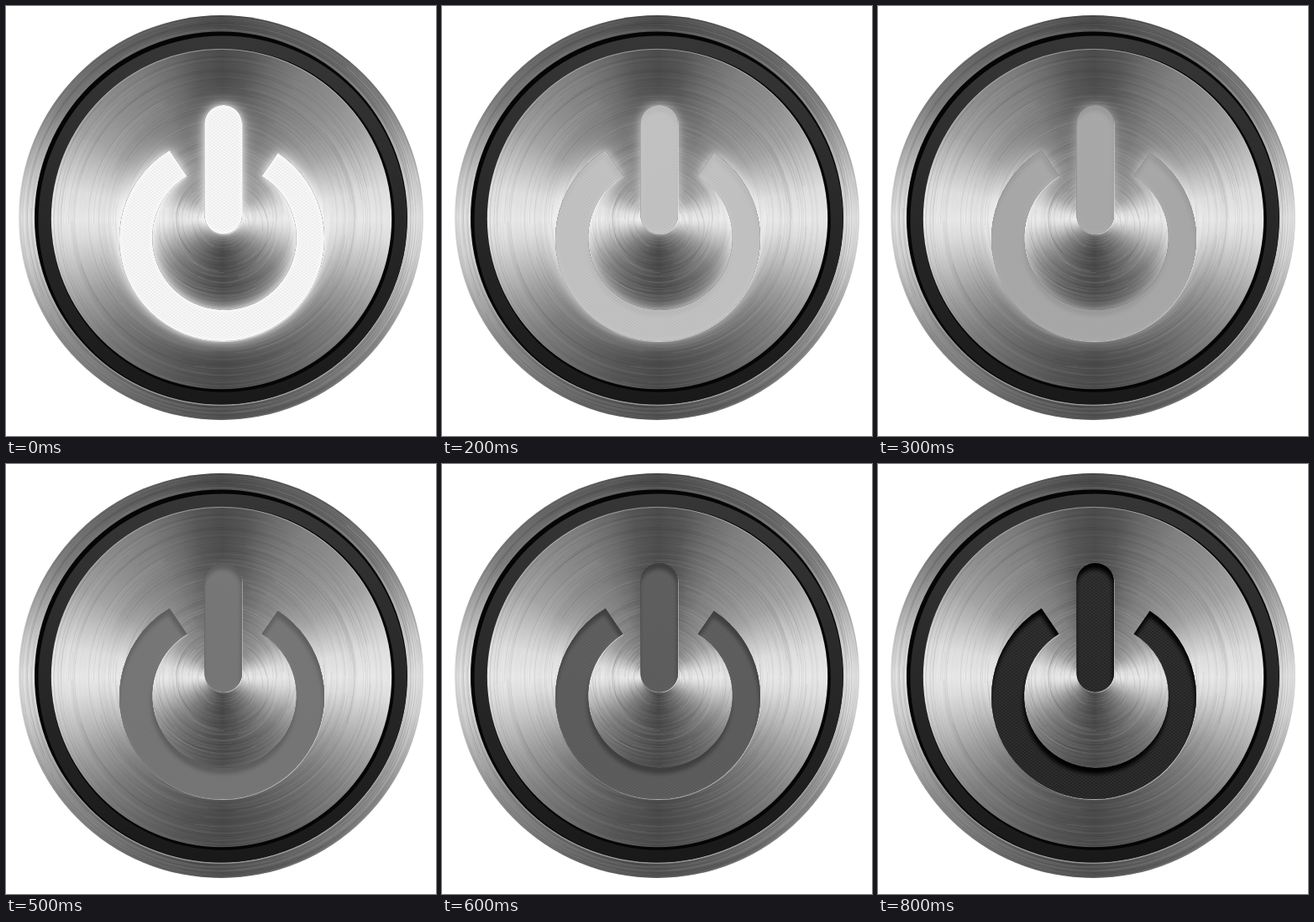
An HTML page with a canvas for the animation above (900 ms loop, 512 px wide and 512 px high).

```html
<!DOCTYPE html>
<html lang="en">
<head>
<meta charset="utf-8">
<title>Power button</title>
<style>
  html, body { margin: 0; width: 100%; height: 100%; overflow: hidden; background: #fff; }
  canvas { display: block; width: 512px; height: 512px; }
</style>
</head>
<body>
<canvas id="stage" width="512" height="512"></canvas>
<script>
const SIZE = 512, STEP = 100, STEPS = 9;
const GLOW = [1, .85, .7, .5, .3, .08, 0, 0, 0];
const ctx = document.getElementById('stage').getContext('2d');

// Quarter-turn brightness, from the horizontal to the vertical axis.
const UPPER = [[0, 232], [.03, 222], [.06, 193], [.09, 163], [.125, 144], [.17, 127], [.2, 108], [.225, 86], [.25, 76]];
const LOWER = [[0, 232], [.02, 221], [.05, 192], [.085, 156], [.125, 124], [.17, 101], [.21, 84], [.25, 72]];
const RIM_UPPER = [[0, 228], [.03, 205], [.06, 168], [.1, 124], [.15, 103], [.2, 92], [.25, 72]];
const RIM_LOWER = [[0, 228], [.03, 212], [.06, 180], [.1, 141], [.15, 116], [.2, 92], [.25, 76]];

let seed = 17;
const random = () => (seed = seed * 16807 % 2147483647) / 2147483647;
const grey = v => `rgb(${v},${v},${v})`;

function layer() {
  const c = document.createElement('canvas');
  c.width = c.height = SIZE;
  return c.getContext('2d');
}

function disc(x, y, r) {
  const p = new Path2D();
  p.arc(x, y, r, 0, Math.PI * 2);
  return p;
}

function vertical(g, y0, y1, top, bottom) {
  const fill = g.createLinearGradient(0, y0, 0, y1);
  fill.addColorStop(0, top);
  fill.addColorStop(1, bottom);
  return fill;
}

function metal(g, x, y, upper, lower) {
  const fill = g.createConicGradient(0, x, y);
  for (const [t, v] of lower) {
    fill.addColorStop(t, grey(v));
    fill.addColorStop(.5 - t, grey(v));
  }
  for (const [t, v] of upper) {
    fill.addColorStop(.5 + t, grey(v));
    fill.addColorStop(1 - t, grey(v));
  }
  return fill;
}

function brush(g, clip, x, y, r0, r1, count) {
  g.save();
  g.clip(clip);
  for (let i = 0; i < count; i++) {
    const start = random() * Math.PI * 2;
    g.strokeStyle = random() < .5 ? '#fff' : '#000';
    g.globalAlpha = .02 + random() * .07;
    g.lineWidth = .4 + random() * .8;
    g.beginPath();
    g.arc(x, y, r0 + random() * (r1 - r0), start, start + .4 + random() * 2.2);
    g.stroke();
  }
  g.restore();
}

function powerSymbol() {
  const p = new Path2D();
  p.roundRect(236.5, 118, 44.5, 153.5, 22.25);
  p.moveTo(194, 171);
  p.arc(260, 276, 86, Math.atan2(-74, -45), Math.atan2(-74, 45), true);
  p.arc(257, 277, 122, Math.atan2(-104, 68), Math.atan2(-106, -63));
  p.closePath();
  return p;
}

const symbol = powerSymbol();
const outside = new Path2D();
outside.rect(-100, -100, 712, 712);
outside.addPath(symbol);

function insetShadow(g, color, blur, dx, dy) {
  g.save();
  g.clip(symbol);
  g.shadowColor = color;
  g.shadowBlur = blur;
  g.shadowOffsetX = dx;
  g.shadowOffsetY = dy;
  g.fillStyle = color;
  g.fill(outside, 'evenodd');
  g.restore();
}

function mesh(g, color) {
  g.save();
  g.clip(symbol);
  g.strokeStyle = color;
  g.lineWidth = 1;
  g.beginPath();
  for (let x = -200; x < 760; x += 5) {
    g.moveTo(x, 110); g.lineTo(x + 420, 410);
    g.moveTo(x, 110); g.lineTo(x - 420, 410);
  }
  g.stroke();
  g.restore();
}

function drawButton() {
  const g = layer();
  const rim = disc(256, 252, 241), face = disc(256.5, 253.5, 202.7);

  g.fillStyle = metal(g, 256, 252, RIM_UPPER, RIM_LOWER);
  g.fill(rim);
  brush(g, rim, 256, 252, 222, 241, 150);

  g.fillStyle = vertical(g, 250, 477, 'rgba(255,255,255,0)', 'rgba(255,255,255,.4)');
  g.fill(disc(256.3, 253.3, 222.7));
  g.fillStyle = '#050505';
  g.fill(disc(256, 252.5, 222));
  g.save();
  g.clip(disc(256, 252.5, 222));
  g.fillStyle = vertical(g, 36, 475, '#363636', '#191919');
  g.fill(disc(258, 255, 219.5));
  g.restore();
  g.fillStyle = '#050505';
  g.fill(disc(258.3, 255.3, 204.5));

  g.fillStyle = metal(g, 258, 254, UPPER, LOWER);
  g.fill(face);
  brush(g, face, 258, 254, 2, 203, 620);
  brush(g, face, 258, 264, 2, 85, 110);
  g.strokeStyle = vertical(g, 51, 250, 'rgba(255,255,255,.4)', 'rgba(255,255,255,0)');
  g.stroke(disc(256.5, 253.5, 202.2));
  return g.canvas;
}

function drawUnlit() {
  const g = layer();
  g.save();
  g.translate(.7, 1);
  g.fillStyle = 'rgba(255,255,255,.5)';
  g.fill(symbol);
  g.restore();
  g.fillStyle = vertical(g, 118, 399, '#272727', '#222');
  g.fill(symbol);
  mesh(g, 'rgba(255,255,255,.05)');
  insetShadow(g, '#000', 5, -1, 7);
  return g.canvas;
}

function drawLit() {
  const g = layer();
  g.fillStyle = '#f8f8f8';
  g.fill(symbol);
  mesh(g, 'rgba(0,0,0,.045)');
  insetShadow(g, '#fff', 7, 0, 0);
  return g.canvas;
}

function drawGlow() {
  const g = layer();
  g.fillStyle = '#fff';
  for (const [blur, alpha] of [[26, .8], [10, .75]]) {
    g.shadowBlur = blur;
    g.shadowColor = `rgba(255,255,255,${alpha})`;
    g.fill(symbol);
  }
  return g.canvas;
}

const button = drawButton(), unlit = drawUnlit(), lit = drawLit(), glow = drawGlow();

function paint(image, alpha = 1) {
  ctx.globalAlpha = alpha;
  ctx.drawImage(image, 0, 0);
}

function render(now) {
  const step = Math.floor(now / STEP) % STEPS;
  ctx.clearRect(0, 0, SIZE, SIZE);
  paint(button);
  paint(glow, GLOW[step]);
  paint(unlit);
  paint(lit, 1 - step / (STEPS - 1));
}

const began = performance.now();
function tick() {
  render(performance.now() - began);
  requestAnimationFrame(tick);
}
tick();
</script>
</body>
</html>
```
